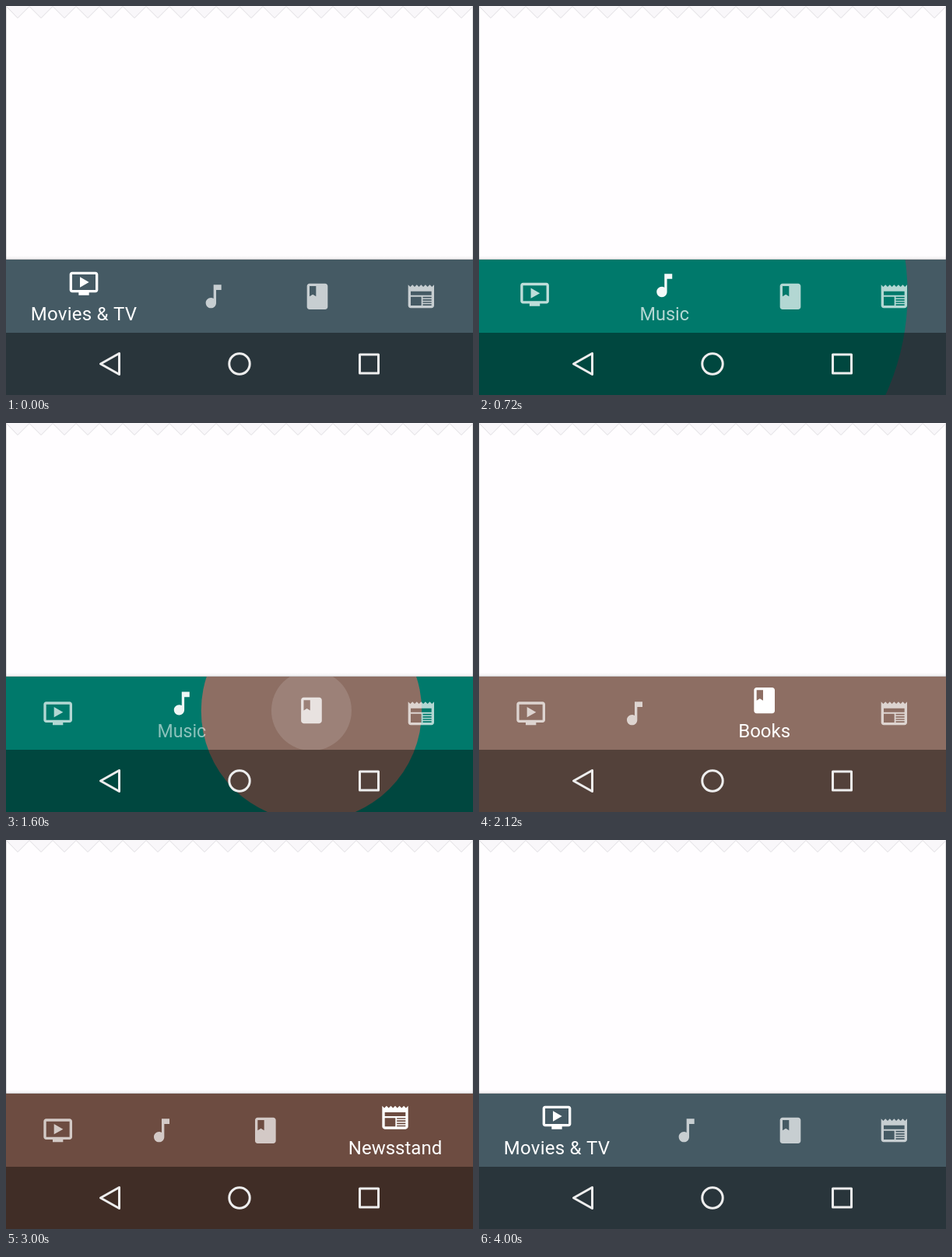
Recreate the animation shown at these times as an HTML page with a canvas. Size 600 by 500 pixels, loop 4480 ms.

```html
<!DOCTYPE html>
<html lang="en">
<head>
<meta charset="utf-8">
<title>Bottom navigation</title>
<style>
  html, body { margin: 0; width: 100%; height: 100%; overflow: hidden; background: #fffdff; }
  canvas { display: block; }
</style>
</head>
<body>
<canvas id="stage" width="600" height="500"></canvas>
<script>
const ctx = document.getElementById('stage').getContext('2d');
const LOOP = 4480, W = 600, BAR = 326, NAV = 420, END = 500;
const SLOT = W / 4.5;               // an idle tab; the active one is 1.5 slots wide
const IDLE_Y = 373.3, ACTIVE_Y = 356.7;

const tabs = [
  { label: 'Movies & TV', color: '#455a64', spacing: '.25px',
    icon: 'M21 3H3c-1.11 0-2 .89-2 2v12c0 1.1.89 2 2 2h5v2h8v-2h5c1.1 0 2-.9 2-2V5c0-1.11-.9-2-2-2zm0 14H3V5h18v12zM16 11l-7 4V7z' },
  { label: 'Music', color: '#00796b', spacing: '0px',
    icon: 'M12 3v10.55c-.59-.34-1.27-.55-2-.55-2.21 0-4 1.79-4 4s1.79 4 4 4 4-1.79 4-4V7h4V3z' },
  { label: 'Books', color: '#8d6e63', spacing: '0px',
    icon: 'M18 2H6c-1.1 0-2 .9-2 2v16c0 1.1.9 2 2 2h12c1.1 0 2-.9 2-2V4c0-1.1-.9-2-2-2zM6 4h5v8l-2.5-1.5L6 12z' },
  { label: 'Newsstand', color: '#6d4c41', spacing: '0px',
    icon: 'M22 3l-1.67 1.67L18.67 3 17 4.67 15.33 3l-1.66 1.67L12 3l-1.67 1.67L8.67 3 7 4.67 5.33 3 3.67 4.67 2 3v16c0 1.1.9 2 2 2h16c1.1 0 2-.9 2-2z' +
      'M4 8h16v3H4zM4 12.3h8.2V19H4zM13.3 12.3H20v1h-6.7zM13.3 14.2H20v1h-6.7zM13.3 16.1H20v1h-6.7zM13.3 18H20v1h-6.7z' }
];
tabs.forEach(tab => tab.path = new Path2D(tab.icon));

const clamp = v => Math.max(0, Math.min(1, v));
const mix = (a, b, p) => a + (b - a) * p;

// cubic-bezier(.41, 0, .03, 1), solved by bisection
function ease(x) {
  if (x <= 0 || x >= 1) return clamp(x);
  let lo = 0, hi = 1, s;
  for (let i = 0; i < 24; i++) {
    s = (lo + hi) / 2;
    const at = 3 * s * (1 - s) * ((1 - s) * .41 + s * .03) + s ** 3;
    if (at < x) lo = s; else hi = s;
  }
  return s * s * (3 - 2 * s);
}

function circle(x, y, r, color) {
  ctx.fillStyle = color;
  ctx.beginPath();
  ctx.arc(x, y, r, 0, 2 * Math.PI);
  ctx.fill();
}

function clipRows(top, bottom, draw) {
  ctx.save();
  ctx.beginPath();
  ctx.rect(0, top, W, bottom - top);
  ctx.clip();
  draw();
  ctx.restore();
}

function drawPage() {
  ctx.fillStyle = '#fffdff';
  ctx.fillRect(0, 0, W, END);
  ctx.beginPath();
  ctx.moveTo(0, 0);
  for (let x = 0; x < W; x += 30) {
    ctx.lineTo(x + 15, 15.5);
    ctx.lineTo(x + 30, .5);
  }
  ctx.fillStyle = '#f9f7fa';
  ctx.fill();
  ctx.lineWidth = 1;
  ctx.strokeStyle = '#dedce0';
  ctx.stroke();
  ctx.fillStyle = '#e0dee1';
  ctx.fillRect(0, 0, 1, BAR);
  ctx.fillRect(W - 1, 0, 1, BAR);
  const shade = ctx.createLinearGradient(0, 321, 0, BAR);
  shade.addColorStop(0, 'rgba(0,0,0,0)');
  shade.addColorStop(.75, 'rgba(0,0,0,.05)');
  shade.addColorStop(1, 'rgba(0,0,0,.3)');
  ctx.fillStyle = shade;
  ctx.fillRect(0, 321, W, 5);
}

function drawSystemNav() {
  ctx.fillStyle = 'rgba(0,0,0,.41)';
  ctx.fillRect(0, NAV, W, END - NAV);
  ctx.strokeStyle = '#eee';
  ctx.lineWidth = 3;
  ctx.lineJoin = 'round';
  ctx.stroke(new Path2D('M121.5 460L145.5 446.5V473.5Z'));
  ctx.strokeRect(454.5, 448, 24, 24);
  ctx.beginPath();
  ctx.arc(300, 460, 13.2, 0, 2 * Math.PI);
  ctx.stroke();
}

const tabX = (i, active) => SLOT * (i + (i < active ? .5 : i === active ? .75 : 1));

function drawTab(tab, x, y, on) {
  ctx.save();
  ctx.fillStyle = '#fff';
  ctx.globalAlpha = mix(.7, 1, on);
  ctx.translate(x, y);
  ctx.scale(5 / 3, 5 / 3);
  ctx.translate(-12, -12);
  ctx.fill(tab.path, 'evenodd');
  ctx.restore();

  if (on <= .5) return;
  const size = mix(.85, 1, on);
  ctx.save();
  ctx.fillStyle = '#fff';
  ctx.globalAlpha = 2 * on - 1;
  ctx.translate(x, 396);
  ctx.scale(size, size);
  ctx.font = '24px Roboto, sans-serif';
  ctx.letterSpacing = tab.spacing;
  ctx.textAlign = 'center';
  ctx.fillText(tab.label, 0, 8);
  ctx.restore();
}

function draw(time) {
  // a tab is tapped once every second
  const step = Math.floor((time - 510) / 1000);
  const from = (step + 4) % 4, to = (from + 1) % 4;
  const t = time - 510 - step * 1000;
  const moving = step >= 0 && step < 4;
  const prev = moving ? from : 0, next = moving ? to : 0;
  const p = moving ? ease(t / 420) : 1;
  const place = tabs.map((tab, i) => {
    const on = (i === prev ? 1 - p : 0) + (i === next ? p : 0);
    return { x: mix(tabX(i, prev), tabX(i, next), p), y: mix(IDLE_Y, ACTIVE_Y, on), on };
  });

  drawPage();
  ctx.fillStyle = tabs[prev].color;
  ctx.fillRect(0, BAR, W, END - BAR);
  if (moving) {
    const { x, y } = place[next];
    const grow = clamp((t - 11) / 337);
    const reach = Math.hypot(Math.max(tabX(next, next), W - tabX(next, next)), 130);
    clipRows(BAR, END, () => {
      if (grow === 1) {
        ctx.fillStyle = tabs[next].color;
        ctx.fillRect(0, BAR, W, END - BAR);
      } else {
        circle(x, 370, reach * Math.sin(grow * Math.PI / 2), tabs[next].color);
      }
    });
    const touch = clamp(t / 195);
    if (touch < 1) {
      clipRows(BAR, NAV, () =>
        circle(x, y, 72 * touch * (2 - touch), `rgba(255,255,255,${.25 * (1 - touch)})`));
    }
  }
  drawSystemNav();
  tabs.forEach((tab, i) => drawTab(tab, place[i].x, place[i].y, place[i].on));
}

const start = performance.now();
function tick() {
  draw((performance.now() - start) % LOOP);
  requestAnimationFrame(tick);
}
tick();
</script>
</body>
</html>
```
